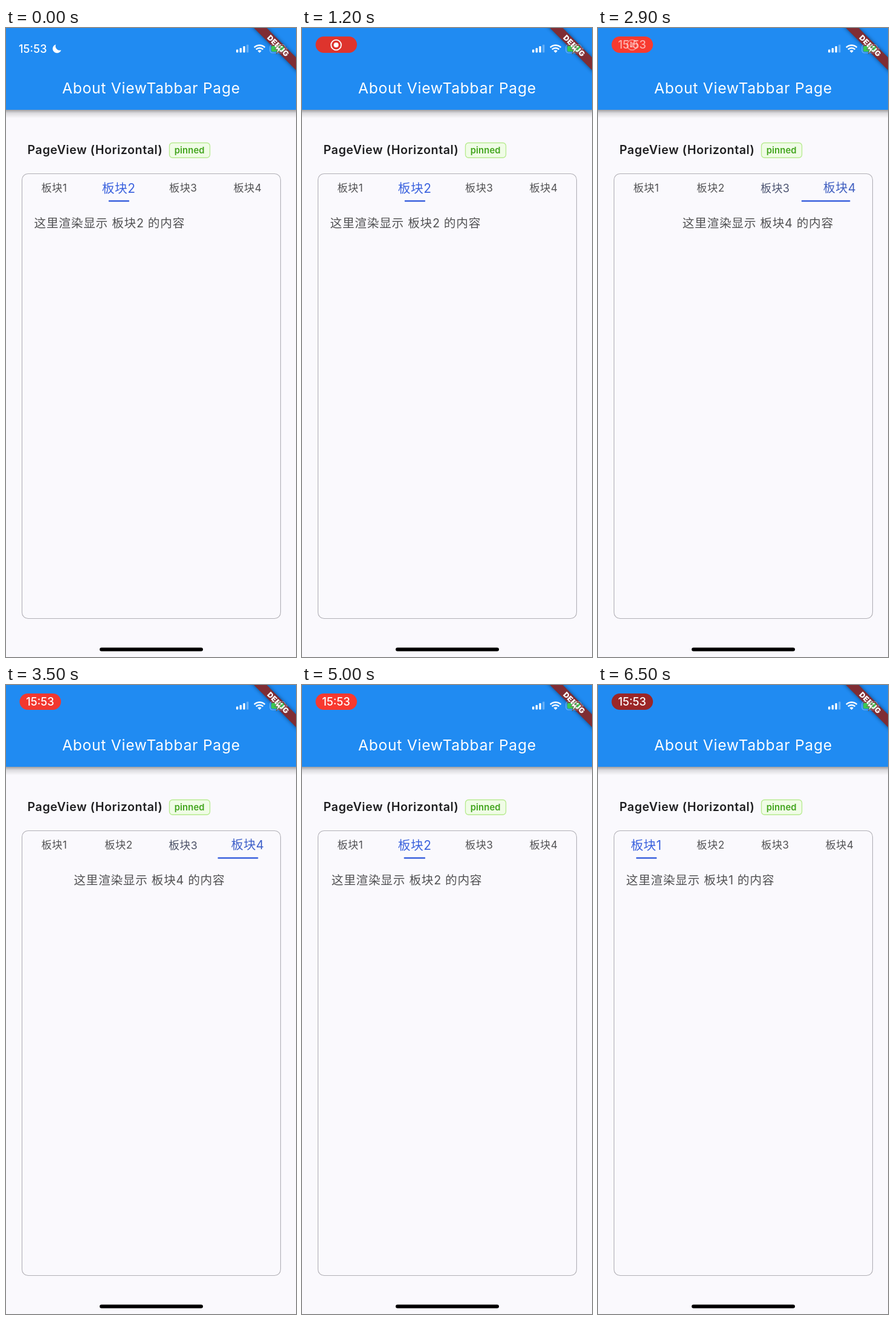
An HTML page for the animation above (6600 ms loop, 480 by 1038 pixels).

```html
<!DOCTYPE html>
<html lang="zh">
<head>
<meta charset="utf-8">
<title>About ViewTabbar Page</title>
<style>
  html, body { margin: 0; width: 100%; height: 100%; overflow: hidden; background: #faf9fd; }
  svg { display: block; width: 480px; height: 1038px; }
  text { font-family: Inter, "Noto Sans CJK SC", "Noto Sans CJK", sans-serif; white-space: pre; }
  .mid { text-anchor: middle; }
  .page { font-size: 19.7px; letter-spacing: .7px; fill: #525254; }
  .tab { letter-spacing: .4px; }
  .clock { font-size: 18.3px; fill: #fff; font-weight: 500; }
</style>
</head>
<body>
<svg viewBox="0 0 480 1038">
  <defs>
    <linearGradient id="fade" x2="0" y2="1">
      <stop offset="0" stop-color="#000" stop-opacity=".36"/>
      <stop offset=".4" stop-color="#000" stop-opacity=".12"/>
      <stop offset="1" stop-color="#000" stop-opacity="0"/>
    </linearGradient>
    <filter id="blur" x="-20%" y="-100%" width="140%" height="300%"><feGaussianBlur stdDeviation="3"/></filter>
    <clipPath id="card"><rect x="26" y="240" width="429" height="735" rx="10"/></clipPath>
  </defs>

  <rect width="480" height="1038" fill="#faf9fd"/>
  <rect y="135" width="480" height="14" fill="url(#fade)"/>
  <rect width="480" height="135" fill="#208bf2"/>
  <text class="mid" x="240.4" y="108" font-size="24.6" letter-spacing=".75" fill="#fff">About ViewTabbar Page</text>

  <text x="35.5" y="208" font-size="19.7" font-weight="600" letter-spacing=".56" fill="#1e1e20">PageView (Horizontal)</text>
  <rect x="270.5" y="189.5" width="67" height="24.5" rx="5" fill="#f0fce6" stroke="#b7eb8f" stroke-width="1.3"/>
  <text class="mid" x="303.7" y="206.5" font-size="14.8" font-weight="600" letter-spacing=".15" fill="#41a41c">pinned</text>

  <g clip-path="url(#card)"><g id="pages"></g></g>
  <rect x="26.5" y="240.5" width="428" height="734" rx="10" fill="none" stroke="#b1b0b6" stroke-width="1.1"/>
  <g id="tabs"></g>
  <rect id="line" y="284.2" height="2.6" rx=".8" fill="#3b62de"/>
  <rect x="155" y="1022.5" width="171" height="6" rx="3"/>

  <!-- debug ribbon -->
  <g transform="translate(450.5 29.5) rotate(45)">
    <rect x="-70" y="-7.5" width="140" height="15" fill="#000" opacity=".5" filter="url(#blur)"/>
    <rect x="-70" y="-7.5" width="140" height="15" fill="#7f2d34"/>
  </g>

  <!-- status bar -->
  <g fill="#fff">
    <rect x="381" y="35.5" width="3.4" height="5" rx="1"/>
    <rect x="386.7" y="33" width="3.4" height="7.5" rx="1"/>
    <rect x="392.4" y="30" width="3.4" height="10.5" rx="1"/>
    <rect x="398.1" y="27.5" width="3.4" height="13" rx="1" opacity=".32"/>
    <path d="M419.7 41l-3.2-3.3a4.6 4.6 0 0 1 6.4 0z"/>
  </g>
  <g fill="none" stroke="#fff" stroke-width="2.5">
    <path d="M413.9 35.4a8.2 8.2 0 0 1 11.6 0"/>
    <path d="M410.9 32.2a12.5 12.5 0 0 1 17.6 0"/>
  </g>
  <rect x="437" y="27.5" width="25" height="13.5" rx="4" fill="none" stroke="#fff" stroke-opacity=".4" stroke-width="1.2"/>
  <path d="M464 32v5a3 3 0 0 0 0-5z" fill="#fff" opacity=".45"/>
  <rect x="439" y="29.5" width="21" height="9.5" rx="2.3" fill="#3ec553"/>
  <text class="mid" y="4.4" font-size="12.3" font-weight="900" letter-spacing=".4" fill="#fff" transform="translate(450.5 29.5) rotate(45)">DEBUG</text>
  <path d="M453 25.5l-8 9.8h4.6l-2.2 7.7 8.6-10.2h-4.8z" fill="#fff" stroke="#5f4c35" stroke-width=".9"/>

  <g id="plain">
    <text class="clock" x="21" y="41">15:53</text>
    <path d="M82.5 27.2a7.2 7.2 0 1 0 8.8 9.2a7 7 0 0 1-8.8-9.2z" fill="#fff"/>
  </g>
  <g id="pill">
    <rect id="fill" x="22.5" y="14" width="68.5" height="27" rx="13.5"/>
    <g id="rec">
      <circle cx="56.5" cy="28" r="8.4" fill="none" stroke="#fff" stroke-width="1.8"/>
      <circle cx="56.5" cy="28" r="4" fill="#fff"/>
    </g>
    <text id="clock" class="clock mid" x="56.5" y="34.3">15:53</text>
  </g>
</svg>
<script>
const LOOP = 6600, SWIPE = 600, PAGE = 428, STEP = 106.7, TAB0 = 79.8;
const START_PAGE = 1;
// swipe start time and direction
const swipes = [[1728, 1], [2560, 1], [3392, -1], [4022, -1], [4983, -1]];
// pill brightness over time
const glow = [[700, .4], [1200, .7], [2200, 1], [3500, .88], [4400, 1], [5500, .88], [6200, .88], [6500, .08]];

const $ = id => document.getElementById(id);
const clamp = v => Math.max(0, Math.min(1, v));
const mix = (a, b, k) => a + (b - a) * k;
const rgb = (a, b, k) => `rgb(${a.map((v, i) => Math.round(mix(v, b[i], k)))})`;
const ramp = (t, from, to) => clamp((t - from) / (to - from));
const glide = u => 1 - (1 - u) ** 3 * (1 + 3 * u);

function addText(parent, cls, x, label) {
  const el = document.createElementNS("http://www.w3.org/2000/svg", "text");
  el.setAttribute("class", cls);
  el.setAttribute("x", x);
  el.textContent = label;
  $(parent).append(el);
  return el;
}

const tabs = [0, 1, 2, 3].map(i => {
  addText("pages", "page", 46.6 + i * PAGE, `这里渲染显示 板块${i + 1} 的内容`).setAttribute("y", 329.4);
  return addText("tabs", "tab mid", TAB0 + i * STEP, `板块${i + 1}`);
});

function track(points, t) {
  const i = points.findIndex(p => p[0] > t);
  if (i === 0) return points[0][1];
  if (i < 0) return points[points.length - 1][1];
  const [a, b] = [points[i - 1], points[i]];
  return mix(a[1], b[1], ramp(t, a[0], b[0]));
}

function drawPages(t) {
  const pos = swipes.reduce((p, [at, dir]) => p + dir * glide(ramp(t, at, at + SWIPE)), START_PAGE);
  $("pages").setAttribute("transform", `translate(${-pos * PAGE} 0)`);

  tabs.forEach((tab, i) => {
    const near = clamp(1 - Math.abs(pos - i));
    const size = mix(17.3, 20.8, near);
    tab.setAttribute("font-size", size);
    tab.setAttribute("y", 264 + size * .365);
    tab.setAttribute("fill", rgb([82, 82, 84], [59, 98, 222], near));
  });

  // the leading edge moves in the first half, the trailing edge in the second
  const base = Math.floor(pos + 1e-6), part = pos - base;
  const left = TAB0 - 16.7 + (base + clamp(2 * part - 1)) * STEP;
  const right = TAB0 + 17.5 + (base + clamp(2 * part)) * STEP;
  $("line").setAttribute("x", left);
  $("line").setAttribute("width", right - left);
}

function drawStatus(t) {
  const shown = ramp(t, 500, 800), clock = ramp(t, 2750, 3000);
  $("plain").setAttribute("opacity", 1 - shown);
  $("pill").setAttribute("opacity", shown);
  $("rec").setAttribute("opacity", 1 - clock);
  $("clock").setAttribute("opacity", clock);
  $("fill").setAttribute("fill", rgb([146, 36, 38], [255, 59, 48], track(glow, t)));
}

function frame() {
  const t = performance.now() % LOOP;
  drawPages(t);
  drawStatus(t);
  requestAnimationFrame(frame);
}
frame();
</script>
</body>
</html>
```
